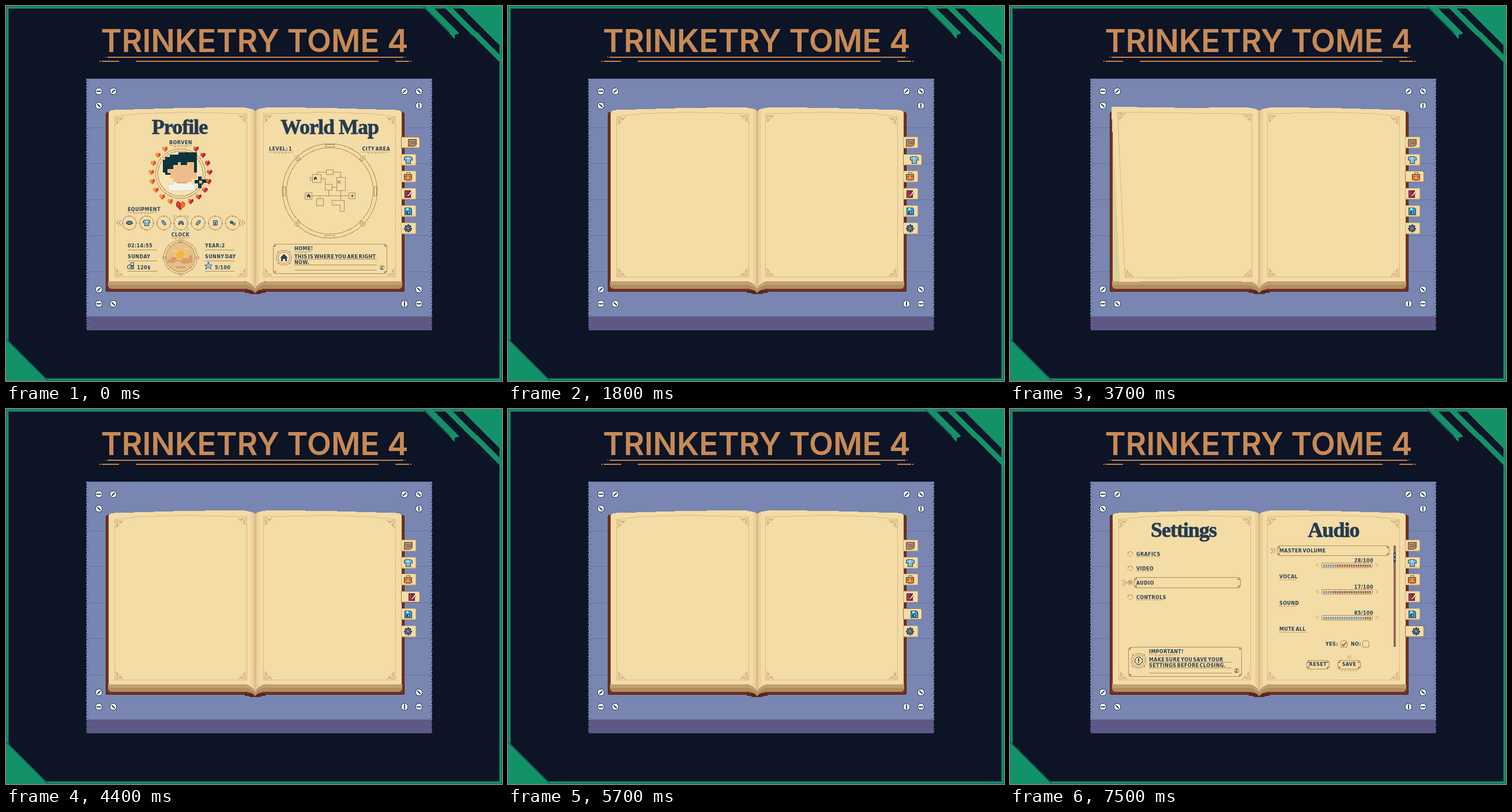
An HTML page that plays this animation: 860x651 px, repeating every 8 s.

```html
<!DOCTYPE html>
<html lang="en">
<head>
<meta charset="utf-8">
<title>Trinketry Tome 4</title>
<style>
  html, body { margin: 0; width: 100%; height: 100%; overflow: hidden; background: #0c1426; }
  svg { display: block; width: 860px; height: 651px; shape-rendering: crispEdges; }
  .big { font: 600 55px Inter, sans-serif; letter-spacing: -.2px; fill: #c78a56; text-anchor: middle; }
  .head { font: bold 36px "Liberation Serif", "Times New Roman", serif; letter-spacing: -1px;
          fill: #263a52; stroke: #263a52; stroke-width: .8px; text-anchor: middle; }
  .txt { font: bold 8px "DejaVu Sans", sans-serif; letter-spacing: .4px; word-spacing: -2px; fill: #2c4054; }
</style>
</head>
<body>
<svg id="stage" viewBox="0 0 860 651"></svg>
<script>
const INK = '#2c4054', PAPER = '#f3dca5', LINE = '#b18a5e', FAINT = '#d8b887', BROWN = '#96695a';

// Drawing helpers, each returning markup
const rect = (x, y, w, h, fill = 'none', stroke = 'none', r = 0) =>
  `<rect x="${x}" y="${y}" width="${w}" height="${h}" rx="${r}" fill="${fill}" stroke="${stroke}"/>`;
const circ = (x, y, r, fill = 'none', stroke = LINE) =>
  `<circle cx="${x}" cy="${y}" r="${r}" fill="${fill}" stroke="${stroke}"/>`;
const line = (d, stroke = LINE, w = 1, dash = 'none') =>
  `<path d="${d}" fill="none" stroke="${stroke}" stroke-width="${w}" stroke-dasharray="${dash}"/>`;
const fill = (d, color, stroke = 'none') => `<path d="${d}" fill="${color}" stroke="${stroke}"/>`;
const text = (x, y, s, anchor = 'start') => `<text class="txt" x="${x}" y="${y}" text-anchor="${anchor}">${s}</text>`;
const head = (x, s) => `<text class="head" x="${x}" y="222">${s}</text>`;
const at = (x, y, s, scale = 1) => `<g transform="translate(${x} ${y}) scale(${scale})">${s}</g>`;
const mirror = s => `<g transform="matrix(-1 0 0 1 864 0)">${s}</g>`;
const group = (id, s) => `<g id="${id}" display="none">${s}</g>`;
const each = (list, fn) => list.map(fn).join('');
const dots = (x, y, w) => line(`M${x} ${y + .5}h${w}`, LINE, 1, '2 1');
const rule = (x, y, w) => line(`M${x} ${y + .5}h${w}`);
const wavy = (x, y, w) => dots(x, y, w) + line(`M${x + w * .2} ${y + 2.5}h${w * .6}`, LINE, 1, '3 3');
const arrows = (x, y, turn = 0) =>
  `<g transform="translate(${x} ${y}) rotate(${turn})">${line('M-4 -5l4 5l-4 5M0 -5l4 5l-4 5')}</g>`;

// Box with scooped corners
function plate(x, y, w, h) {
  const d = (a, b) => `M${a + 3} ${b}h${w - 6}v3h3v${h - 6}h-3v3h${6 - w}v-3h-3v${6 - h}h3z`;
  return fill(d(x + .5, y + .5), 'none', LINE) +
    each([[0, 0], [w, 0], [0, h], [w, h]], ([a, b]) => circ(x + a + (a ? -2 : 3), y + b + (b ? -2 : 3), 1.5));
}

function corner(x, y, sx, sy) {
  return `<g transform="translate(${x} ${y}) scale(${sx} ${sy})">` +
    circ(3.5, 3.5, 2.5, 'none', '#cfa878') + circ(9, 3.5, 1.5, 'none', '#cfa878') + circ(3.5, 9, 1.5, 'none', '#cfa878') +
    line('M14 0q-1 4 -5 6M0 14q4 -1 6 -5M7 7l2 2M12 3h1M3 12v1', '#cfa878') + '</g>';
}

const teeth = () => each([...Array(42).keys()], i => {
  const y = Math.round(130 + i * 10.4);
  return rect(139, y, 2, 1, '#0c1426') + rect(141, y + 1, 4, 1, '#65719c') +
    rect(737, y, 2, 1, '#0c1426') + rect(733, y + 1, 4, 1, '#65719c') +
    rect(139, y + 4, 1, 3, '#0c1426') + rect(738, y + 5, 1, 3, '#0c1426');
});

const SCREWS = [[161, 148, 0], [186, 148, -45], [161, 173, 45], [691, 148, -45], [716, 148, 45], [716, 173, 90],
  [161, 492, -45], [161, 517, 0], [186, 517, 45], [716, 492, 45], [691, 517, 90], [716, 517, 0]];

function backdrop() {
  const g = '#139168', dark = '#0e6455';
  const frame = (inset, w, c) => `<rect x="${inset + w / 2}" y="${inset + w / 2}" width="${860 - 2 * inset - w}" ` +
    `height="${651 - 2 * inset - w}" fill="none" stroke="${c}" stroke-width="${w}"/>`;
  return rect(0, 0, 860, 651, '#0c1426') + frame(0, 1, dark) + frame(1, 3, g) + frame(4, 1, '#0d5149') +
    fill('M0 578L73 651H0z', g) + line('M0 578L73 651', dark, 2) +
    fill('M723 0H739L786 48L778 50V58L768 46z', g) + line('M723 0L770 47', dark, 2) +
    fill('M757 0H770L860 88V101z', g) + fill('M787 0H860V72z', g) +
    `<text class="big" x="431" y="80">TRINKETRY TOME 4</text>` +
    rect(172, 88, 2, 1, '#c78a56') + rect(176, 88, 513, 2, '#c9834d') + rect(691, 88, 2, 1, '#c78a56') +
    each([[162, 2], [166, 30], [225, 421], [675, 24], [701, 2]], ([x, w]) => rect(x, 95, w, 2, '#c9834d'));
}

function board() {
  return rect(139, 126, 600, 437, '#7886b1') + rect(139, 126, 600, 1, '#65719c') + rect(139, 539, 600, 24, '#5d5885') +
    each([211, 273, 336, 398, 461], y => rect(139, y, 34, 1, '#65719c') + rect(691, y, 48, 1, '#65719c')) + teeth() +
    each(SCREWS, ([x, y, a]) => circ(x, y, 6, '#eaf4ef', '#36455f') +
      `<g transform="translate(${x} ${y}) rotate(${a})">${line('M-4 0h8', '#36455f', 1.5)}</g>`);
}

function leaf() {
  return fill('M177 478H411Q426 479 432 489V498Q426 491 412 491H183Q177 490 177 485z', '#b08d60') +
    fill('M177 478H411Q426 479 432 489V493Q425 484 411 484H177z', '#c0a072') +
    fill('M178 186Q178 181 188 180.500L290 177.500L400 175.500Q425 176 432 183V490Q426 478 410 478H178z', PAPER) +
    fill('M425 178Q429 179 432 183V490Q429 482 425 480z', '#ecd09a') +
    line('M188.500 192L230 187L310 184.500L417.500 187V470.500H188.500z', FAINT) +
    corner(189, 192, 1, 1) + corner(417, 188, -1, 1) + corner(189, 470, 1, -1) + corner(417, 470, -1, -1);
}

function book() {
  return rect(173.5, 184.5, 517, 311, '#74301f', '#45201f', 3) + fill('M414 494H450V498H444L440 500H424L420 498H414z', '#5a241f') +
    leaf() + mirror(leaf()) + rect(430, 183, 4, 304, '#dfbd8b');
}

// Turning sheet: position of the free edge at each step, [top x, top y, bottom x, bottom y]
const POSES = [[728, 160, 684, 482], [676, 142, 620, 486], [520, 137, 490, 488],
  [290, 146, 322, 485], [190, 165, 235, 480], [176, 175, 190, 479]];

function sheet([tx, ty, bx, by]) {
  const dir = tx < 432 ? -1 : 1, mid = 432 + (tx - 432) * .17;
  const pt = (u, v) => {
    const x1 = 432 + (tx - 432) * u, x2 = 432 + (bx - 432) * u;
    const y1 = 179 + (ty - 179) * u - 6 * (1 - u) * u, y2 = 478 + (by - 478) * u;
    return [x1 + (x2 - x1) * v, y1 + (y2 - y1) * v];
  };
  const inner = [pt(.96, .03), pt(.05, .03), pt(.05, .975), pt(.96, .975)];
  const wide = Math.abs(tx - 432) > 120;
  return `<g clip-path="url(#pages)">${fill(`M${tx} 184V206L${bx + dir * 13} 478H${bx}z`, '#dbd09d')}</g>` +
    fill(`M${tx} ${ty}Q${mid} ${ty + (179 - ty) * .55} 432 182V480Q${mid} 476 ${bx} ${by}z`, PAPER) +
    line(`M${tx} ${ty}L${bx} ${by}`, '#e6c992') + rect(430, 182, 3, 300, '#dfbd8b') +
    line(`M${inner.map(p => p.join(' ')).join('L')}z`, FAINT) +
    (wide ? each(inner, ([x, y], i) => corner(x, y, (i % 3 ? 1 : -1) * dir, i < 2 ? 1 : -1)) : '');
}

// Icons, centred on 0,0
const shirt = c => fill('M-7 -4L-3 -6H3L7 -4V0H4V6H-4V0H-7z', c, INK) + rect(-1, -5, 2, 4, '#d8eef4');
const house = c => fill('M0 -6L6 0H5V6H2V2H-2V6H-5V0H-6z', c);
const floppy = fill('M-6 -6H4L6 -4V6H-6z', '#2b9ccb', INK) + rect(-3, -5, 4, 3, '#d8eef4') + rect(-3, 1, 6, 4, INK) + rect(0, 2, 2, 2, '#d8eef4');
const gear = each([0, 45, 90, 135], a => `<g transform="rotate(${a})">${rect(-1.5, -7, 3, 14, '#33475f')}</g>`) +
  circ(0, 0, 4.5, '#5a7392', '#33475f') + circ(0, 0, 1.5, PAPER, INK);
const ICONS = [
  fill('M-7 -4L-4 -6H7V4L4 6H-7z', '#b48b70', '#54403f') + line('M-5 -2H2V3M5 -4V1H-3V4', '#7d5a50'),
  shirt('#7fbbdb'),
  rect(-6.5, -4, 13, 10, '#dd8440', '#5b332c', 2) + line('M-3 -4V-7H3V-4', '#3f6b54') + rect(-6, 0, 12, 1, '#8f4a30') + rect(-1, 0, 2, 3, '#f5cf77'),
  rect(-6, -6, 10, 12, '#93263f', '#4b2336') + rect(-4, -5, 1, 11, '#d4576a') + line('M0 4L7 -4', '#f2efe2', 2) + line('M1 4L7 -2', INK),
  floppy, gear
];
const GEAR_ICONS = [
  `<ellipse cx="0" cy="0" rx="6" ry="4" fill="#48607e" stroke="${INK}"/>` + rect(-3, -1, 6, 1, '#9cc1d4'),
  shirt('#8fb3c9'),
  fill('M-5 -4L0 -5L5 3L2 5L-2 2z', '#7d9fc0', INK),
  fill('M-5 4V-1L-2 -4H2L5 -1V4H2V1H-2V4z', '#5c7797', INK),
  fill('M5 -4L0 -5L-5 3L-1 5L3 1z', '#7d9fc0', INK),
  fill('M-4 -5H4V5H1V-1H-1V5H-4z', '#8fb3c9', INK),
  circ(-2, -1, 3, '#48607e', INK) + circ(3, 2, 2.5, '#7d9fc0', INK)
];

function slot(x, y, icon = '') {
  return circ(x, y, 12) + each([[0, -12], [0, 12], [-12, 0], [12, 0]], ([a, b]) => rect(x + a - 1, y + b - 1, 2, 2, LINE)) +
    at(x, y, icon, .85);
}

const tabs = on => each(ICONS, (icon, i) => {
  const y = Math.round(227 + i * 29.7) + .5, out = i === on;
  return rect(685, y, out ? 32 : 25.5, 19, PAPER, out ? '#9c7353' : '#d0a978', 2) +
    rect(686, y + 17.5, out ? 30 : 24, 1, '#dfbd87') + at(out ? 704 : 697, y + 9.5, icon);
});

const heart = (x, y, a, b, k) => at(x, y,
  fill('M0 5L-5 0V-3L-3 -5H-2L0 -3z', a) + fill('M0 5L5 0V-3L3 -5H2L0 -3z', b) + rect(-3, -3, 1, 2, '#ffd0a0'), k);

function hearts() {
  const ring = [...Array(8).keys()].map(i => {
    const a = (-58 + i * 18.2) * Math.PI / 180, x = Math.cos(a) * 50.5, y = 292 + Math.sin(a) * 51;
    return heart(302.5 + x, y, '#e2463f', '#b92b40', .95) + heart(302.5 - x, y, '#f38b35', '#dd552d', .95);
  });
  return ring.join('') + heart(302.5, 347, '#c9302f', '#f0693a', 1.6);
}

const portrait = () => circ(302.5, 291, 43) + circ(302.5, 291, 39, '#f7e3b3') +
  fill('M276 262H284V258H299V254H331V289H325V296H285V293H276V289H272V267H276z', '#0b343d') +
  fill('M298 271H303V276H314V271H326V289H331V300H322V305H290V299H285V290H280V283H290V276H298z', '#efbd8d') +
  fill('M281 309H290V305H322V309H327V320H281z', '#f8f3e6', '#cfd3cc') + rect(296, 305, 18, 3, '#e3aa7c') +
  each([[333, 296], [342, 301], [333, 310], [327, 302]], ([x, y]) => rect(x, y, 6, 6, '#0b343d')) +
  rect(333, 301, 9, 9, '#0b343d') + rect(335, 303, 5, 5, '#efbd8d');

const clock = () => circ(302.5, 436, 29) + circ(302.5, 436, 25.5, '#e6c184') + circ(302.5, 432, 8, '#f4b544', '#f7cf78') +
  fill('M280 440H286V436H296V441H306V438H317V433H323V446H317V452H311V455H294V452H287V446H280z', '#d99c6c') +
  fill('M283 446H293V443H303V447H321L315 452H290z', '#e8bd8b') + rect(288, 424, 8, 2, '#f1d7a4') + rect(309, 421, 8, 2, '#f1d7a4') +
  each([[302, 407], [302, 465], [273, 436], [331, 436]], ([x, y]) => rect(x - 2, y - 1, 5, 3, PAPER, LINE));

function profile() {
  return head(301, 'Profile') + text(303, 240, 'BORVEN', 'middle') + wavy(284, 242, 38) + portrait() + hearts() +
    text(211, 356, 'EQUIPMENT') + wavy(211, 358, 51) + each(GEAR_ICONS, (s, i) => slot(214 + i * 29.8, 376.5, s)) +
    line('M291 369V364H296M310 364H315V369M315 384V389H310M296 389H291V384', '#8fa7b0') +
    arrows(196, 376.5, 180) + arrows(410, 376.5) + text(302.5, 400, 'CLOCK', 'middle') + wavy(287, 402, 31) + clock() +
    text(211, 419, '02:14:55') + text(211, 438, 'SUNDAY') + text(227, 457, '120$') +
    text(345, 419, 'YEAR:2') + text(345, 438, 'SUNNY DAY') + text(362, 457, '5/100') +
    each([423, 442, 460], y => rule(211, y, 51) + rule(345, y, 51)) +
    circ(214, 453, 3.5, '#d9c9a0', INK) + circ(219, 448, 3, '#efdfb2', INK) + circ(219, 454, 2.5, '#a8a089', INK) +
    fill('M351 444L353 449H358L354 452L356 457L351 454L346 457L348 452L344 449H349z', '#8fc4e2', '#51728f');
}

function worldMap() {
  const x0 = 561.5, y0 = 321, q = 57;
  return head(561, 'World Map') + text(456, 251, 'LEVEL: 1') + wavy(456, 253, 43) + text(666, 251, 'CITY AREA', 'end') + wavy(617, 253, 49) +
    circ(x0, y0, 82) + circ(x0, y0, 75) +
    each([-79, 79], d => rect(x0 - 8, y0 + d - 2, 16, 4, PAPER, LINE) + rect(x0 + d - 2, y0 - 8, 4, 16, PAPER, LINE)) +
    each([[-q, -q], [q, -q], [-q, q], [q, q]], ([x, y]) => circ(x0 + x, y0 + y, 4, PAPER) + circ(x0 + x, y0 + y, 1, LINE)) +
    line('M539.500 292V288.500H555M567 288.500H580.500V297M546 299.500H553.500V309M530 329.500H594M559.500 319V329M580.500 320V337M544.500 329V334M565 314.500H573M532 297H527V302H532') +
    each([[531, 292, 15, 14], [555, 284, 12, 8], [573, 297, 15, 23], [553, 309, 12, 10], [518, 324, 12, 11], [594, 324, 11, 10], [538, 334, 12, 12]],
      ([x, y, w, h]) => rect(x + .5, y + .5, w, h, PAPER, LINE)) +
    fill('M565.500 337.500H586.500V356.500H579.500V345.500H565.500z', PAPER, LINE) +
    at(536.5, 299, house(INK), .5) + at(524.5, 329.5, house(INK), .6) + line('M575 303l5 5m0 -5l-5 5', INK) + line('M598 329.500h5M600.500 327v5', INK) +
    note(463, 197, 482, 500, 'HOME!', ['THIS IS WHERE YOU ARE RIGHT', 'NOW.'], 30, at(482, 437, house(INK), 1.05));
}

function note(x, w, cx, tx, title, rows, wave, icon) {
  return plate(x, 413, w, 51) + circ(cx, 437, 13) + circ(cx, 437, 10, '#f7e3b3') +
    each([[-10, -10], [10, -10], [-10, 10], [10, 10]], ([a, b]) => rect(cx + a - 1, 436 + b, 2, 2, LINE)) + icon +
    text(tx, 424, title) + wavy(tx, 426, wave) + each(rows, (s, i) => text(tx, 437.5 + i * 10, s)) +
    each([439, 449, 458], y => rule(tx, y, 143)) + circ(x + w - 8, 454, 4, PAPER) + line(`M${x + w - 10} 452h4l-4 4h4`, INK);
}

const ROWS = ['GRAFICS', 'VIDEO', 'AUDIO', 'CONTROLS'];
const PANELS = [
  ['Grafics', ['TEXTURES', 'SHADOWS', 'DETAILS', 'LOW MODE'], [60, 45, 70]],
  ['Video', ['BRIGHTNESS', 'CONTRAST', 'GAMMA', 'FULLSCREEN'], [50, 64, 40]],
  ['Audio', ['MASTER VOLUME', 'VOCAL', 'SOUND', 'MUTE ALL'], [28, 17, 85]]
];

function gauge(y, n) {
  const cells = [...Array(21).keys()];
  return text(630, y - 5, n + '/100', 'end') + rect(540.5, y - 3.5, 88, 8, PAPER, LINE, 2) +
    each(cells, i => rect(543 + i * 4, y - 1, 3, 4, i / 21 < n / 100 ? '#7699bd' : BROWN)) +
    at(533, y, arrows(0, 0, 180), .6) + at(636, y, arrows(0, 0), .6);
}

const button = (x, label) => plate(x, 436, 39, 15) + text(x + 20, 446, label, 'middle');

function settings(on) {
  const [title, labels, values] = PANELS[on];
  return head(301, 'Settings') + each(ROWS, (s, i) => {
    const y = 251 + i * 25;
    return circ(208.5, y + .5, 4) + text(219, y + 3.5, s) + (i === on
      ? plate(215, y - 9, 184, 18) + arrows(198, y + .5) + line(`M206 ${y - 2}l5 5m0 -5l-5 5`, INK)
      : dots(219, y + 5, s.length * 6));
  }) +
    note(205, 196, 223, 241, 'IMPORTANT!', ['MAKE SURE YOU SAVE YOUR', 'SETTINGS BEFORE CLOSING.'], 53,
      circ(223, 437, 6.5, PAPER, INK) + rect(222, 433, 2, 5, INK) + rect(222, 439, 2, 2, INK)) +
    head(561, title) + plate(463, 237, 194, 17) + arrows(456, 246) +
    each(labels, (s, i) => text(467, [249, 294, 340, 385][i], s) + (i ? dots(467, [0, 296, 342, 387][i], s.length * 6) : '')) +
    each(values, (n, i) => gauge(271 + i * 45.5, n)) +
    text(547, 411, 'YES:') + rect(573.5, 402.5, 11, 11, PAPER, LINE, 3) + line('M576 408l2 3l5 -6', BROWN, 2) +
    text(591, 411, 'NO:') + rect(611.5, 402.5, 11, 11, PAPER, LINE, 3) +
    button(514, 'RESET') + button(568, 'SAVE') + at(588, 431, arrows(0, 0, 90), .8) + line('M574 454.500h28', LINE, 1, '3 2') +
    rect(665, 237, 4, 176, BROWN) + rect(665, 249, 4, 17, '#33475f') + rect(666, 252, 2, 3, '#8fb3c9') + rect(666, 259, 2, 3, '#8fb3c9');
}

// Plain spread of slots under two headings
function slots(left, right, rows) {
  const grid = x0 => each([...Array(rows * 5).keys()], i => slot(x0 + i % 5 * 36, 264 + Math.floor(i / 5) * 36));
  return head(301, left) + head(561, right) + grid(231) + grid(490);
}

const SPREADS = [profile() + worldMap(), slots('Outfit', 'Armor', 4), slots('Bag', 'Items', 5), slots('Quests', 'Notes', 3),
  slots('Save', 'Load', 3), settings(0), settings(1), settings(2)];

const stage = document.getElementById('stage');
stage.innerHTML = '<defs><clipPath id="pages"><rect x="178" y="180" width="508" height="298"/></clipPath></defs>' +
  backdrop() + board() + book() +
  each(ICONS, (_, i) => group('tab' + i, tabs(i))) +
  each(SPREADS, (s, i) => group('spread' + i, s)) +
  each(POSES, (p, i) => group('pose' + i, sheet(p)));

const show = (name, count, on) => {
  for (let i = 0; i < count; i++) document.getElementById(name + i).setAttribute('display', i === on ? 'inline' : 'none');
};

// Each turn lasts 800 ms, then the next spread rests for 500 ms
function stateAt(t) {
  if (t < 500) return [0, 0, -1];
  if (t >= 7000) return [5, t < 7500 ? 6 : 7, -1];
  const turn = Math.floor((t - 500) / 1300), p = (t - 500) % 1300;
  return p < 800 ? [turn, -1, Math.floor(p / 100) - 1] : [turn + 1, turn + 1, -1];
}

let last = '';
const start = performance.now();
function draw() {
  const state = stateAt((performance.now() - start) % 8000), key = state.join();
  if (key !== last) {
    last = key;
    show('tab', ICONS.length, state[0]);
    show('spread', SPREADS.length, state[1]);
    show('pose', POSES.length, state[2]);
  }
  requestAnimationFrame(draw);
}
draw();
</script>
</body>
</html>
```
